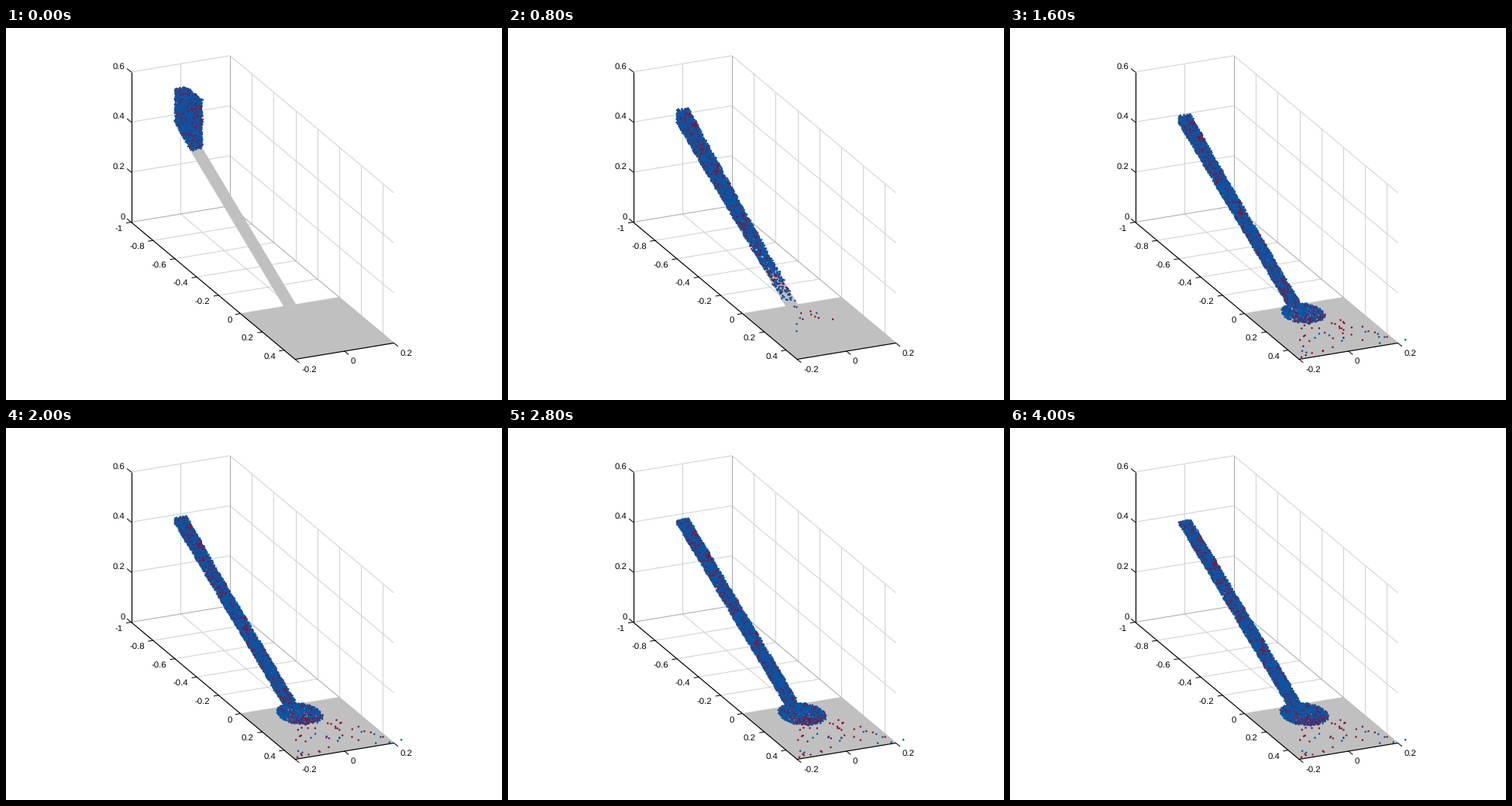
Animation of 640 by 480 pixels, one loop 4200 ms. Source, as a matplotlib script:

```python
import numpy as np
import matplotlib.pyplot as plt
from matplotlib.animation import FuncAnimation

FRAMES, INTERVAL = 21, 200
PX = 0.72  # points per pixel at 100 dpi
BLUE, RED, GREY = "#0a55a4", "#8f1030", "#c0c0c0"
SLOPE = np.tan(np.radians(20))
HALF = 0.025  # half the chute width
GRAINS, STRAYS = 7000, 60

plt.rcParams["text.hinting"] = "none"
fig = plt.figure(figsize=(6.4, 4.8), dpi=100, facecolor="white")
ax = fig.add_axes([0, 0, 1, 1])
ax.set(xlim=(0, 640), ylim=(480, 0))
ax.axis("off")


def project(x, y, z):
    return (161.5 + 141 * (x + 1) + 318.75 * (y + 0.2),
            250.5 + 118 * (x + 1) - 52.5 * (y + 0.2) - 323 * z)


def segment(a, b, color, width, order):
    (x0, y0), (x1, y1) = project(*a), project(*b)
    ax.plot([x0, x1], [y0, y1], color=color, lw=width * PX, zorder=order,
            solid_capstyle="butt")


def face(points):
    ax.fill(*zip(*[project(*p) for p in points]), color=GREY, lw=0, zorder=3)


def tick(point, shift, label, offset, align):
    x, y = project(*point)
    ax.plot([x, x + shift[0]], [y, y + shift[1]], color="black", lw=PX, zorder=5)
    ax.text(x + offset[0], y + offset[1] + 4, label, ha=align, va="baseline",
            family="Liberation Sans", size=11.4 * PX, zorder=5)


def draw_axes():
    grid, edge = "#d0d0d0", "#a8a8a8"
    for x in np.arange(-0.8, 0.5, 0.2):
        segment((x, -0.2, 0), (x, 0.2, 0), grid, 1, 1)
        segment((x, 0.2, 0), (x, 0.2, 0.6), grid, 1, 1)
    for z in (0.2, 0.4, 0.6):
        segment((-1, -0.2, z), (-1, 0.2, z), grid, 1, 1)
        segment((-1, 0.2, z), (0.5, 0.2, z), grid, 1, 1)
    segment((-1, 0, 0), (0.5, 0, 0), grid, 1, 1)
    segment((-1, 0, 0), (-1, 0, 0.6), grid, 1, 1)
    for end in ((-1, -0.2, 0), (0.5, 0.2, 0), (-1, 0.2, 0.6)):
        segment((-1, 0.2, 0), end, edge, 1, 2)

    face([(0, -0.2, 0), (0, 0.2, 0), (0.5, 0.2, 0), (0.5, -0.2, 0)])
    face([(-1, -HALF, SLOPE), (-1, HALF, SLOPE), (0, HALF, 0), (0, -HALF, 0)])

    segment((-1, -0.2, 0), (-1, -0.2, 0.6), "black", 1.2, 4)
    segment((-1, -0.2, 0), (0.5, -0.2, 0), "black", 1.2, 4)
    segment((0.5, -0.2, 0), (0.5, 0.2, 0), "black", 1.2, 4)
    for i in range(4):
        tick((-1, -0.2, i / 5), (-5, -4), f"{i / 5:g}", (-8, -8), "right")
    for i in range(-5, 3):
        tick((i / 5, -0.2, 0), (-6, 1), f"{i / 5:g}", (-11, 7), "right")
    for i in (-1, 0, 1):
        tick((0.5, i / 5, 0), (5, 4), f"{i / 5:g}", (8, 12), "left")


draw_axes()

rng = np.random.default_rng(4)
queue = np.sort(rng.random(GRAINS))  # place in the flow, the highest lead
across = rng.uniform(-HALF, HALF, GRAINS)
lift = rng.random(GRAINS)
radius = np.sqrt(rng.random(GRAINS)) + rng.normal(0, 0.04, GRAINS)
angle = rng.uniform(0, 2 * np.pi, GRAINS)
heap_x = 0.095 + 0.115 * radius * np.cos(angle)
heap_y = 0.083 * radius * np.sin(angle)
red_chance = 0.16 + 0.2 * ((queue > 0.81) & (heap_x > 0.15))
colors = np.where(rng.random(GRAINS) < red_chance, RED, BLUE)

# Strays fan out from the foot of the chute; the fastest leave the floor
births = rng.uniform(3, 6.5, STRAYS)
reach = rng.uniform(0.18, 0.62, STRAYS)
drift = rng.uniform(-0.4, 0.5, STRAYS)
stray_colors = np.where(rng.random(STRAYS) < 0.55, RED, BLUE)


def profile(k):
    """Positions along the chute, depth of the flow and grain density."""
    u = np.linspace(0, 1, 300)
    if k == 0:
        x = -1 + 0.15 * u
        depth = 0.507 + SLOPE * x
        return x, depth, depth
    x = -1 + u * min(1, 0.14 + 0.27 * k)
    back = 0.008 + 0.1 * np.exp(-k / 6)
    base = 0.018 * (1 - np.exp(-k / 6))
    depth = base + (back - base) * (1 - u) ** (0.2 + 0.35 * k)
    thinning = np.exp(-((k - 3.5) / 2) ** 2)
    return x, depth, depth * (1 - thinning * u ** 4)


def flow(k):
    x, depth, density = profile(k)
    share = np.cumsum(density) / density.sum()
    since = max(0, k - 4)
    landed = 0.2 * (1 - np.exp(-since / 6))
    gx = np.interp(queue / (1 - landed), share, x)
    gy = across.copy()
    gz = -SLOPE * gx + lift * np.interp(gx, x, depth)

    heap = queue > 1 - landed
    grow = 1 - 0.35 * np.exp(-since / 3)
    gx[heap] = heap_x[heap] * grow
    gy[heap] = heap_y[heap] * grow
    gz[heap] = (0.03 * grow * np.clip(1 - radius, 0, 1) * lift)[heap]

    near = np.argsort(gx - 0.442 * gy + 0.436 * gz)
    return np.column_stack(project(gx, gy, gz))[near], colors[near]


def strays(k):
    age = np.clip((k - births) / 2.5, 0, 1)
    x = reach * (1 - (1 - age) ** 2)
    shown = (age > 0) & (x < 0.49)
    points = np.column_stack(project(x, drift * x, 0))
    return points[shown], stray_colors[shown]


dots = ax.scatter([], [], s=(2.5 * PX) ** 2, linewidths=0, zorder=6)


def update(k):
    points, shades = zip(flow(k), strays(k))
    dots.set_offsets(np.vstack(points))
    dots.set_facecolor(np.concatenate(shades))
    return (dots,)


animation = FuncAnimation(fig, update, frames=FRAMES, interval=INTERVAL,
                          repeat=True, repeat_delay=0)
plt.show()
```
